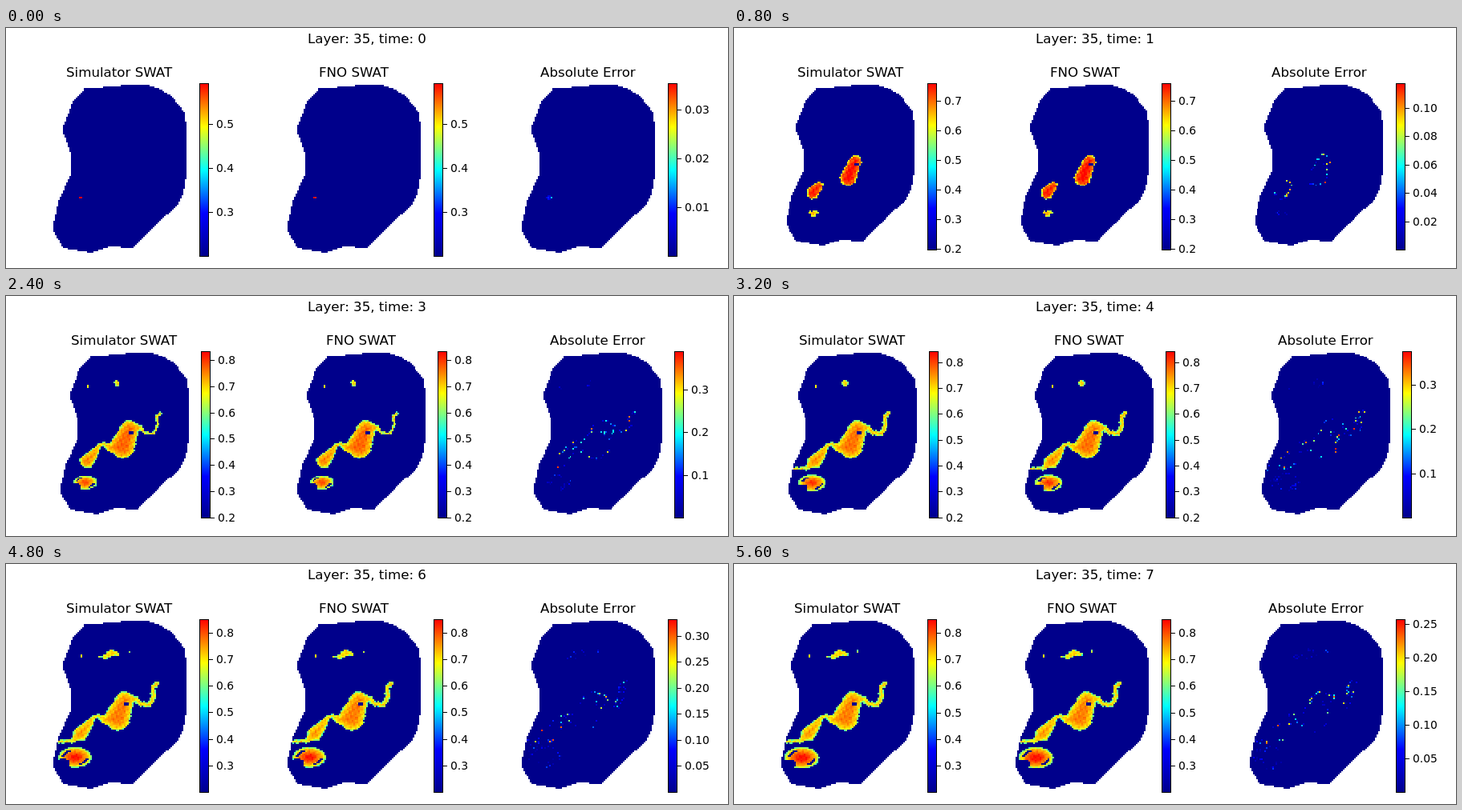
Recreate the animation shown at these times as an HTML page with a canvas. Size 900 by 300 pixels, loop 6400 ms.

```html
<!DOCTYPE html>
<html lang="en">
<head>
<meta charset="utf-8">
<title>Saturation maps</title>
<style>
html, body { margin: 0; width: 100%; height: 100%; overflow: hidden; background: #fff; }
canvas { display: block; }
</style>
</head>
<body>
<canvas id="stage" width="900" height="300"></canvas>
<script>
const ctx = document.getElementById('stage').getContext('2d');
const STEP_MS = 800, CELL = 2, COLS = 88, ROWS = 108, LEFT = 54, TOP = 68;
const FONT = '"DejaVu Sans", sans-serif';
const TITLES = ['Simulator SWAT', 'FNO SWAT', 'Absolute Error'];

// Axes geometry; pitch is the distance between panels
const wide = { right: 225, scale: 1, title: 141.3, bar: 241, bottom: 285, pitch: 292, low: .201 };
const mid = { right: 225, scale: .96, title: 145, bar: 241, bottom: 277, pitch: 292, low: .198 };
const tight = { right: 228, scale: .962, title: 147, bar: 243, bottom: 277, pitch: 295, low: .1985 };
const layouts = [wide, mid, tight, tight, tight, tight, wide, wide];
const maxSaturation = [.592, .759, .815, .834, .842, .847, .85, .851];
const maxError = [.0354, .1175, .36, .39, .375, .364, .332, .257];

const outline = new Path2D('M97 75L142 71 175 70 190 75 205 84 221 104 224 122 224 182 220 206 212 222 187 243 158 274 128 272 105 280 70 274 57 250 65 214 80 182 80 156 69 126 82 92z');

// Water spreads along chains of nodes: x, y, full radius, time of arrival
const chains = [
  [[65, 221, 2, 3], [82, 220, 2.5, 3], [92, 211, 9, -.05], [100, 202, 6.5, 0], [108, 191, 3, 1],
    [115, 189, 2, 1], [123, 194, 6, 1], [138, 191, 16, .4], [147, 170, 11.5, .4], [160, 167, 3, 1.6],
    [167, 174, 3, 2.6], [178, 175, 3, 2.6], [183, 165, 3, 2.6], [182, 153, 3, 2.4], [187, 149, 3.5, 2.4]],
  [[121, 116, 2.5, 4.5], [131, 110, 4.5, 2], [139, 112, 2.5, 5]],
  [[93, 114, 2, 2]], [[115, 115, 1.6, 4]], [[152, 108, 1.5, 5]],
];

const clamp = v => Math.max(0, Math.min(1, v));
const hash = (i, j, seed) => {
  const v = Math.sin(i * 12.9898 + j * 78.233 + seed * 37.719) * 43758.5453;
  return v - Math.floor(v);
};

// Dark blue, blue, cyan, yellow, red at equal distances
function heat(value) {
  const v = 4 * clamp(value);
  const red = clamp(v - 2), green = Math.min(clamp(v - 1), 4 - v);
  const blue = v < 1 ? .545 + .455 * v : clamp(3 - v);
  return `rgb(${[red, green, blue].map(c => Math.round(255 * c))})`;
}

// Depth inside a chain at a point, negative when dry
function chainDepth(nodes, x, y, time) {
  const radius = ([, , r, born]) => r * Math.sqrt(clamp((time - born) / 1.3));
  let depth = -9;
  nodes.forEach((a, n) => {
    const ra = radius(a);
    if (!ra) return;
    const next = nodes[n + 1];
    const b = next && radius(next) ? next : a;
    const dx = b[0] - a[0], dy = b[1] - a[1];
    const t = clamp(((x - a[0]) * dx + (y - a[1]) * dy) / (dx * dx + dy * dy || 1));
    const r = ra + (radius(b) - ra) * t;
    depth = Math.max(depth, r - Math.hypot(x - a[0] - dx * t, y - a[1] - dy * t));
  });
  return depth;
}

// The lower basin is a growing ellipse with two dry arcs and a dry bay
function basinDepth(x, y, time) {
  const rx = 24 * (1 - Math.exp(-time / 3)), ry = .62 * rx;
  const dx = (x - 94 + 1.5 * time) / rx, dy = (y - 237 - .6 * time) / ry;
  const rho = Math.hypot(dx, dy);
  const arc = Math.abs(rho - .72) < .08 && Math.cos(2 * (Math.atan2(dy, dx) - .65)) > .4;
  const bay = Math.hypot(dx + .75, dy - .6) < .45;
  return time && !arc && !bay ? ry * (1 - rho) * time / (time + 2) : -9;
}

function saturation(i, j, time) {
  const x = LEFT + CELL * (i + .5), y = TOP + CELL * (j + .5);
  const ripple = time ? Math.sin(x * .9 + y * .3) * Math.sin(y * .7 - x * .2) : 0;
  const hole = Math.hypot(x - 149, y - 174) < 3;
  const chain = hole ? -9 : Math.max(...chains.map(c => chainDepth(c, x, y, time))) + .8 * ripple;
  const basin = basinDepth(x, y, time);
  const depth = Math.max(chain, basin);
  if (depth <= 0) return 0;
  const core = basin > chain ? .15 * clamp(depth / 8) : .08 * clamp(depth / 10);
  return .58 + .11 * clamp(depth / 2) + core + .012 * ripple + .02 * (hash(i, j, 1) - .5);
}

const land = [];
for (let k = 0; k < COLS * ROWS; k++) {
  const x = LEFT + CELL * (k % COLS + .5), y = TOP + CELL * (Math.floor(k / COLS) + .5);
  land.push(ctx.isPointInPath(outline, x, y));
}

// Simulated, predicted and error fields, each scaled to its colour bar
function fields(time) {
  const { low } = layouts[time], range = maxSaturation[time] - low;
  const sim = land.map((isLand, k) =>
    isLand ? clamp((saturation(k % COLS, Math.floor(k / COLS), time) - low) / range) : 0);
  const fno = sim.slice(), error = sim.map(() => 0);
  const density = .2 + .6 * Math.exp(-4 * time);
  sim.forEach((v, k) => {
    const i = k % COLS, j = Math.floor(k / COLS), y = TOP + CELL * j;
    const edge = [1, -1, COLS, -COLS].some(n => Math.abs(v - sim[k + n]) > .35);
    if (!edge) return;
    const size = hash(i, j, time + 20);
    if (v) fno[k] += (size - .5) * .1;
    if (hash(i, j, time + 5) < density) error[k] = (.12 + .85 * size ** 2) * (y > 130 && y < 224 ? 1 : .35);
  });
  return [sim, fno, error];
}

function text(string, x, y, size, centred) {
  ctx.font = `${size}px ${FONT}`;
  ctx.fillStyle = '#000';
  const shift = centred ? ctx.measureText(string).width / 2 : 0;
  ctx.fillText(string, Math.round(x - shift), y);
}

function drawMap(field, axes, shift) {
  const px = i => Math.round(axes.right - (224 - LEFT - CELL * i) * axes.scale) + shift;
  const py = j => Math.round(70.7 + (TOP - 70 + CELL * j) * axes.scale);
  field.forEach((v, k) => {
    if (!land[k]) return;
    const i = k % COLS, j = Math.floor(k / COLS), x = px(i), y = py(j);
    ctx.fillStyle = heat(v);
    ctx.fillRect(x, y, px(i + 1) - x, py(j + 1) - y);
  });
}

function drawBar(axes, shift, low, high, tick) {
  const x = axes.bar + shift, top = 69, height = axes.bottom - top;
  for (let y = 0; y < height; y++) {
    ctx.fillStyle = heat(1 - y / height);
    ctx.fillRect(x, top + y, 12, 1);
  }
  ctx.strokeStyle = '#000';
  ctx.strokeRect(x + .5, top + .5, 11, height);
  for (let n = Math.max(1, Math.ceil(low / tick)); n * tick <= high; n++) {
    const y = Math.floor(axes.bottom + .5 - (n * tick - low) / (high - low) * height);
    ctx.fillStyle = '#000';
    ctx.fillRect(x + 12, y, 5, 1);
    text((n * tick).toFixed(tick < .1 ? 2 : 1), x + 21, y + 5, 13.89);
  }
}

function draw(time) {
  const axes = layouts[time], error = maxError[time];
  const errorTick = [.01, .02, .05, .1].find(tick => error / tick < 7);
  ctx.fillStyle = '#fff';
  ctx.fillRect(0, 0, 900, 300);
  text(`Layer: 35, time: ${time}`, 450, 19, 16.67, true);
  fields(time).forEach((field, n) => {
    const shift = n * axes.pitch;
    text(TITLES[n], axes.title + shift, 61, 16.67, true);
    drawMap(field, axes, shift);
    if (n < 2) drawBar(axes, shift, axes.low, maxSaturation[time], .1);
    else drawBar(axes, shift, 0, error, errorTick);
  });
}

let shown = -1;
function loop() {
  const time = Math.floor(performance.now() / STEP_MS) % layouts.length;
  if (time !== shown) draw(shown = time);
  requestAnimationFrame(loop);
}
loop();
</script>
</body>
</html>
```
